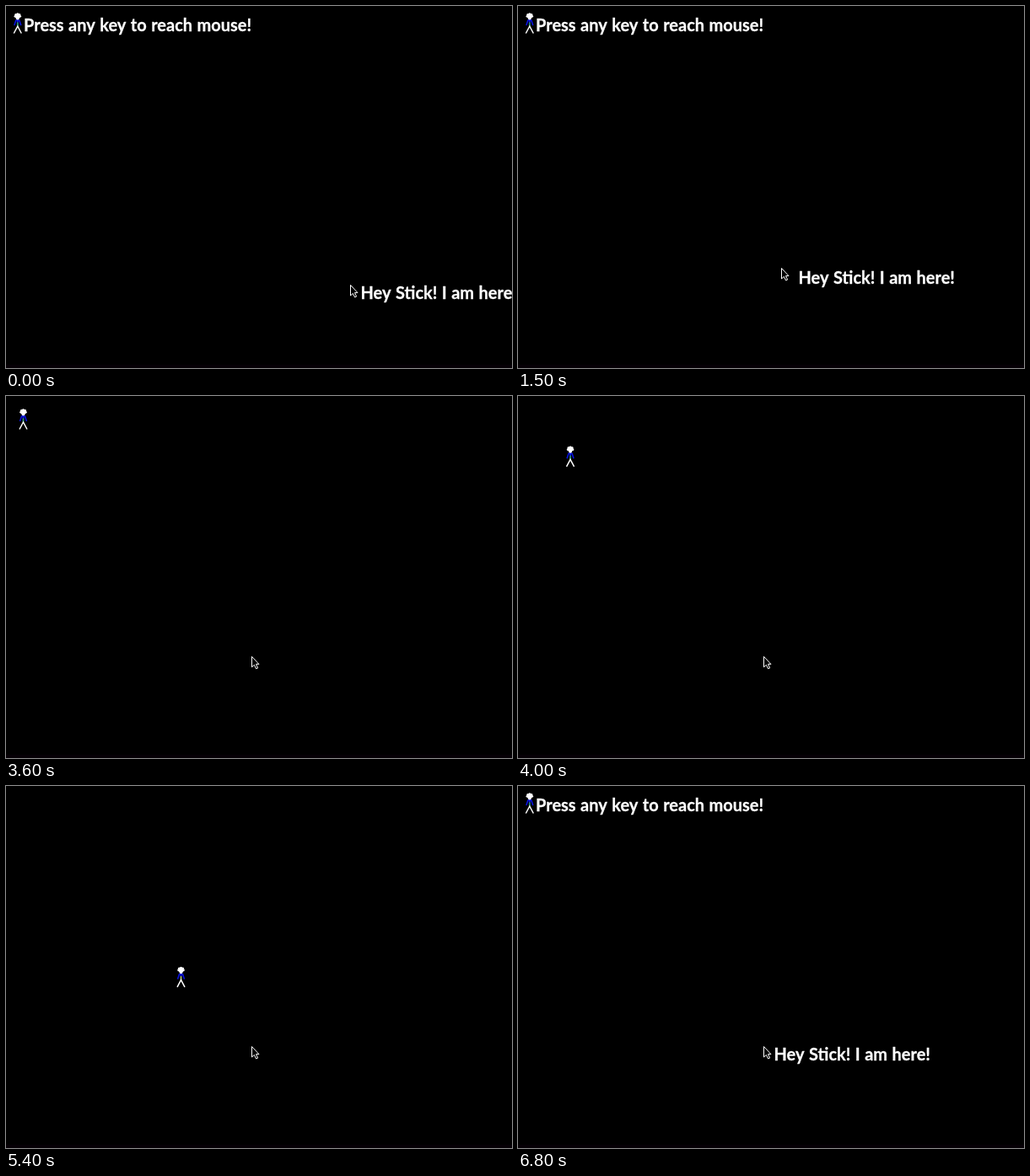
Recreate the animation shown at these times as an HTML page with a canvas. Size 600 px wide and 430 px high, loop 8 s.

```html
<!DOCTYPE html>
<html lang="en">
<head>
<meta charset="utf-8">
<style>
  html, body { margin: 0; width: 100%; height: 100%; overflow: hidden; background: #000; }
  canvas { display: block; }
</style>
</head>
<body>
<canvas id="stage" width="600" height="430"></canvas>
<script>
const LOOP = 8000, STEP = 100;
const ctx = document.getElementById('stage').getContext('2d');
const arrow = new Path2D('M.5 .5V13L3.4 10.4L5.6 15L7.6 14.1L5.5 9.6H9Z');

function label(text, x, y) {
  ctx.font = 'bold 20px Lato, Carlito, sans-serif';
  ctx.wordSpacing = '0.6px';
  ctx.fillStyle = ctx.strokeStyle = '#fff';
  ctx.lineWidth = 0.3;
  ctx.fillText(text, x, y);
  ctx.strokeText(text, x, y);
}

function line(color, width, ...points) {
  ctx.strokeStyle = color;
  ctx.lineWidth = width;
  ctx.beginPath();
  for (const [x, y] of points) ctx.lineTo(x, y);
  ctx.stroke();
}

function dot(x, y, r) {
  ctx.beginPath();
  ctx.arc(x, y, r, 0, 7);
  ctx.fill();
}

function cursor(x, y) {
  ctx.save();
  ctx.translate(Math.floor(x), Math.floor(y));
  ctx.fillStyle = '#000';
  ctx.fill(arrow);
  ctx.strokeStyle = '#fff';
  ctx.lineWidth = 1;
  ctx.stroke(arrow);
  ctx.restore();
}

function stick(x, y, flicker) {
  ctx.save();
  ctx.translate(x, y);
  line('#0a14e0', 1.6, [-4, 2.5], [-2, -3.5], [2, -3.5], [4, 2.5]);
  line('#0a14e0', 2, [0, -5], [0, 3]);
  line(flicker ? '#c8d820' : '#2fae3a', 1.4, [0, -1], [0, 4]);
  line('#fff', 1.5, [-4.5, 12], [0, 3.5], [4.5, 12]);
  ctx.fillStyle = '#fff';
  dot(0, -8.5, 3);
  dot(0, -6, 2);
  for (let puff = -2; puff <= 2; puff++) {
    const angle = puff * 0.85;
    dot(2.9 * Math.sin(angle), -8.5 - 2.4 * Math.cos(angle), 1.4);
  }
  ctx.restore();
}

// Cursor position: rests, jumps at 1400 ms, then eases to its final place.
function mouseAt(t) {
  if (t < 1400) return [408, 331];
  const k = Math.min(1, Math.floor((t - 1400) / STEP) / 6);
  const rest = (1 - k) ** 1.7;
  return [291 + 29 * rest, 309 + 4 * rest];
}

function waiting(t) {
  const tick = Math.floor(t / STEP);
  const flicker = tick === 10 || (tick >= 14 && tick <= 20 && tick % 2 === 0);
  stick(13.8, 20.5, flicker);
  label('Press any key to reach mouse!', 21, 29.5);
  cursor(...mouseAt(t));
  const [x, y] = mouseAt(t - STEP); // the words trail one step behind
  label('Hey Stick! I am here!', x + 12.5, y + 17.3);
}

function walking(t) {
  const i = Math.min(26, Math.floor((t - 3600) / STEP));
  cursor(291, 309);
  stick(20.5 + 10.39 * i, 27.5 + 11.08 * i, i % 4 === 2);
  if (i === 26) label('You have reached!', 301, 331);
}

function draw(now) {
  const t = now % LOOP;
  ctx.fillStyle = '#000';
  ctx.fillRect(0, 0, 600, 430);
  ctx.fillStyle = '#050005';
  ctx.fillRect(0, 426, 600, 4);
  if (t >= 3600 && t < 6800) walking(t);
  else waiting(t);
  requestAnimationFrame(draw);
}
requestAnimationFrame(draw);
</script>
</body>
</html>
```
